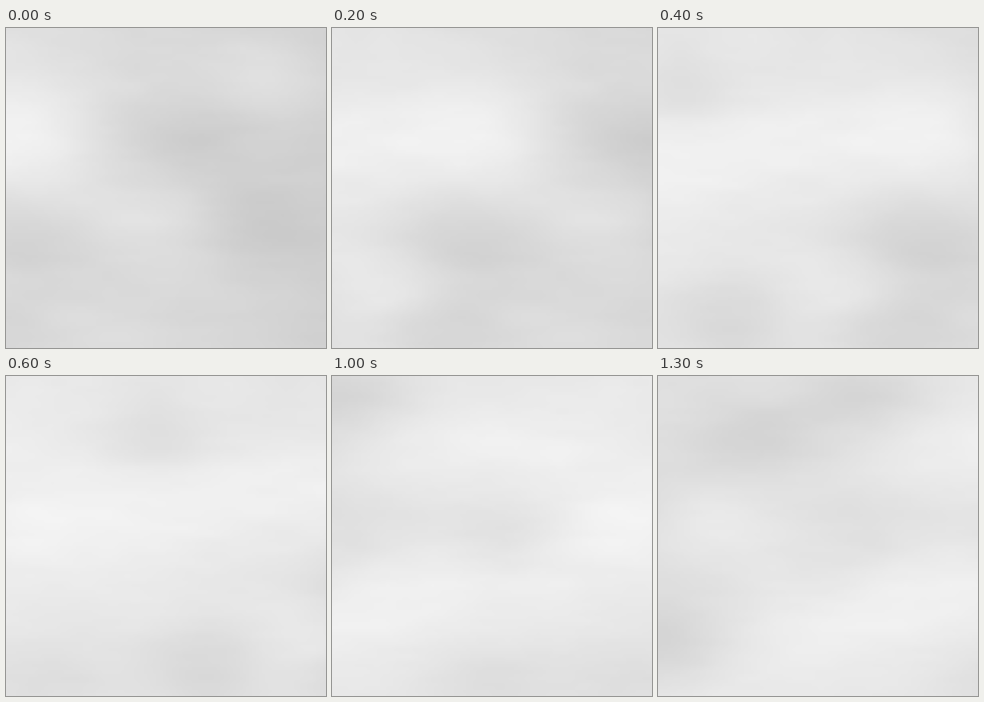
Write an HTML page with a canvas that moves like this. It is 400 by 400 pixels and loops after 1.4 s.

```html
<!DOCTYPE html>
<html lang="en">
<head>
<meta charset="utf-8">
<title>Drifting fog</title>
<style>
  html, body { margin: 0; height: 100%; overflow: hidden; background: #e4e4e4; }
  canvas { display: block; width: 100vw; height: 100vh; }
</style>
</head>
<body>
<canvas id="stage" width="400" height="400"></canvas>
<script>
const SIZE = 400, STEP_MS = 100, STEPS = 14, SHIFT = 80;
const LEFT = -(STEPS - 1) * SHIFT, WIDTH = SIZE - LEFT, CELL = 4;

// Main clouds and gaps: x, y, change of grey
const clouds = [
  [235, 135, -12], [320, 240, -10], [335, 65, 12], [175, 245, 7], [55, 285, -9],
  [20, 130, 8], [-25, 260, -11], [-20, 385, -13], [-95, 330, 8], [-230, 370, -14],
  [-290, 85, -10], [-430, 380, -10], [-540, 85, 7], [-585, 200, -14], [-600, 390, -10],
  [-680, 85, 8], [-770, 200, -8], [-775, 25, -15], [-910, 80, -15], [-965, 185, 8],
  [-1015, 340, -13]
];

const bell = d => Math.exp(-d * d / 2);
const ease = t => t * t * (3 - 2 * t);
const mix = (a, b, t) => a + (b - a) * t;

// Seeded value in -1..1 for a lattice point
function hash(i, j) {
  let h = Math.imul(i, 374761393) ^ Math.imul(j, 668265263);
  h = Math.imul(h ^ (h >>> 13), 1274126177);
  return ((h ^ (h >>> 16)) >>> 0) / 2 ** 31 - 1;
}

function noise(x, y) {
  const i = Math.floor(x), j = Math.floor(y), t = ease(x - i);
  return mix(mix(hash(i, j), hash(i + 1, j), t),
             mix(hash(i, j + 1), hash(i + 1, j + 1), t), ease(y - j));
}

function greyAt(x, y) {
  // The sky is lightest near x = -480, with a bright band that sinks to the left
  let grey = 232 - 14 * ((x + 480) / 680) ** 2;
  const bandY = 135 + 200 * (x / 860) ** 2;
  grey += 11 * bell((y - bandY) / 55) / (1 + Math.exp((x - 90) / 25));
  for (const [cx, cy, change] of clouds) {
    grey += change * bell(Math.hypot((x - cx) / 60, (y - cy) / 38));
  }
  // Thin horizontal wisps
  return grey + 2 * noise(x / 75, y / 24) + noise(x / 32, y / 9);
}

function makeFog() {
  const fog = document.createElement('canvas');
  fog.width = WIDTH / CELL;
  fog.height = SIZE / CELL;
  const g = fog.getContext('2d');
  const image = g.createImageData(fog.width, fog.height);
  for (let j = 0, i = 0; j < fog.height; j++) {
    for (let k = 0; k < fog.width; k++, i += 4) {
      const grey = greyAt(LEFT + (k + 0.5) * CELL, (j + 0.5) * CELL);
      image.data.fill(Math.round(grey), i, i + 3);
      image.data[i + 3] = 255;
    }
  }
  g.putImageData(image, 0, 0);
  return fog;
}

const ctx = document.getElementById('stage').getContext('2d');
const fog = makeFog();
const start = performance.now();
ctx.imageSmoothingQuality = 'high';

function draw() {
  const step = Math.floor((performance.now() - start) / STEP_MS) % STEPS;
  ctx.drawImage(fog, LEFT + step * SHIFT, 0, WIDTH, SIZE);
  requestAnimationFrame(draw);
}
draw();
</script>
</body>
</html>
```
